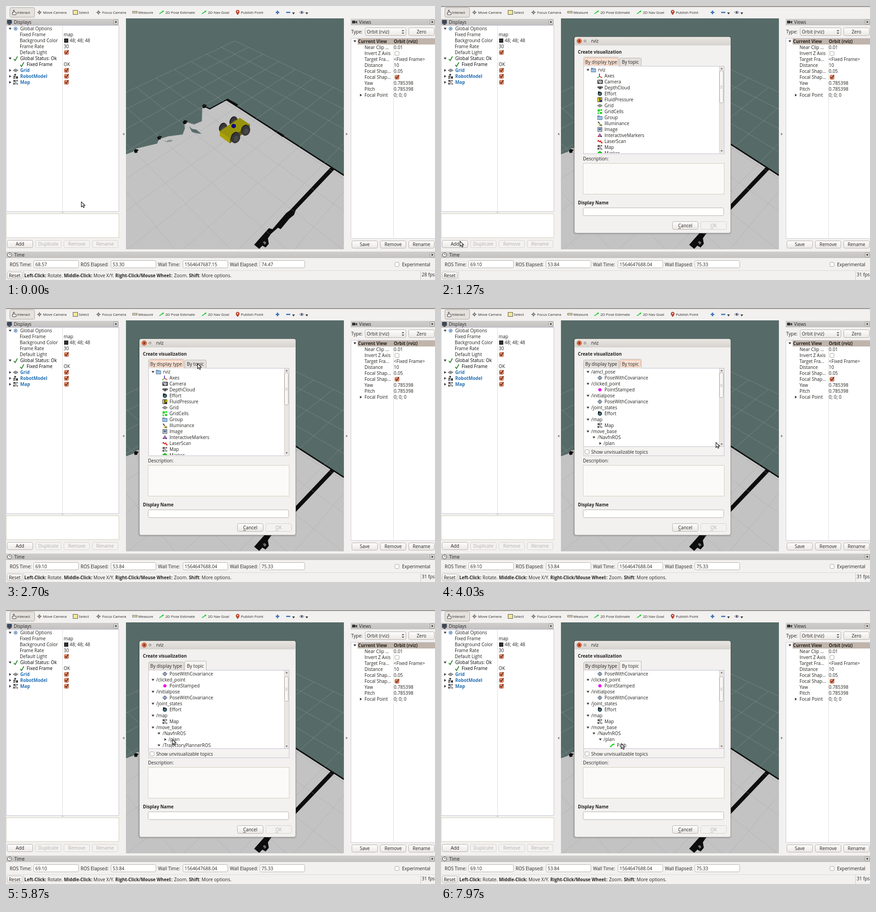
Animation, 937 px wide and 598 px high, one loop 8000 ms. Source, as an HTML page:

```html
<!DOCTYPE html>
<html lang="en">
<head>
<meta charset="utf-8">
<title>Adding a display</title>
<style>
  html, body { margin: 0; width: 100%; height: 100%; overflow: hidden; background: #f2f1f0; }
  svg { display: block; width: 100vw; height: 100vh; }
  text { font: 10px 'Open Sans', 'Noto Sans', sans-serif; fill: #242320; white-space: pre; }
  .bold { font-weight: 700; font-size: 9.7px; }
  .tool { font-size: 8px; }
  .link { font-weight: 700; font-size: 9.8px; fill: #2470b5; }
  .dark { fill: #000; }
  .off { fill: #b5afa9; }
  .mid { text-anchor: middle; }
</style>
</head>
<body>
<svg id="stage" viewBox="0 0 937 598" xmlns="http://www.w3.org/2000/svg"></svg>
<script>
const LOOP = 8000;
const TEAL = '#566b68', FLOOR = '#c3c3c3', INK = '#0d0d0d';

const rect = (x, y, w, h, fill, stroke = 'none', r = 0) =>
  `<rect x="${x}" y="${y}" width="${w}" height="${h}" rx="${r}" fill="${fill}" stroke="${stroke}"/>`;
const box = (x, y, w, h, fill, stroke, r = 0) => rect(x + .5, y + .5, w - 1, h - 1, fill, stroke, r);
const text = (x, y, s, cls = '', id = '') =>
  `<text x="${x}" y="${y}" class="${cls}"${id && ` id="${id}"`}>${s.replace(/</g, '&lt;')}</text>`;
const poly = (pts, fill, more = '') => `<polygon points="${pts}" fill="${fill}" ${more}/>`;
const path = (d, stroke, w = 1, fill = 'none') =>
  `<path d="${d}" stroke="${stroke}" stroke-width="${w}" fill="${fill}"/>`;
const dot = (x, y, r, fill, stroke = 'none') =>
  `<circle cx="${x}" cy="${y}" r="${r}" fill="${fill}" stroke="${stroke}"/>`;
const group = (id, body, more = '') => `<g id="${id}" ${more}>${body}</g>`;

const button = (x, y, w, h, label, off) => box(x, y, w, h, off ? '#f3f2f0' : 'url(#btn)', off ? '#d6d2cd' : '#b4aea8', 3) +
  text(x + w / 2, y + h / 2 + 3.5, label, 'mid' + (off ? ' off' : ''));
const input = (x, y, w, h) => box(x, y, w, h, '#fff', '#b5afa9', 3);
const check = (x, y, on) => box(x, y, 10, 10, on ? '#ea8a68' : '#fdfdfd', on ? '#b9603f' : '#aaa49e', 2) +
  (on ? path(`M${x + 2} ${y + 4.5}l2.5 3l5 -7.5`, '#4a2a1c', 1.6) : '');
const arrowDown = (x, y) => poly(`${x - 3},${y - 2} ${x + 3},${y - 2} ${x},${y + 2.5}`, '#3c3b37');
const arrowRight = (x, y) => poly(`${x - 2},${y - 3} ${x + 2.5},${y} ${x - 2},${y + 3}`, '#3c3b37');
const tick = (x, y) => path(`M${x - 4} ${y + 1}l3 3.5l5 -9`, '#1d7f1d', 1.7);
const closer = (x, y) => box(x - 5, y - 5, 10, 10, '#f4f3f1', '#8d8984', 1) +
  path(`M${x - 2} ${y - 2}l4 4m0 -4l-4 4`, '#33322f', 1.5);
const header = (x, y, w, label, tx) => rect(x, y, w, 14, 'url(#head)') + text(tx, y + 11, label);

const icons = {
  axes: (x, y) => path(`M${x - 1} ${y - 5}v6`, '#2222dd', 1.6) + path(`M${x - 1} ${y + 1}l-5 4`, '#2faa2f', 1.6) +
    path(`M${x - 1} ${y + 1}l6 3`, '#d22', 1.6),
  camera: (x, y) => rect(x - 5, y - 4, 11, 8, '#555', '#333', 1) + dot(x + 1, y, 2.8, '#9ab', '#ddd') + rect(x - 4, y - 3, 2, 2, '#eee'),
  cloud: (x, y) => rect(x - 5, y - 3, 11, 4, '#333', 'none', 1) + rect(x - 2, y + 1, 5, 2, '#444') +
    dot(x - 2, y - 1, 1, '#ccc') + dot(x + 3, y - 1, 1, '#ccc'),
  effort: (x, y) => dot(x, y, 4.6, '#26343c') + dot(x, y + .5, 2.4, '#4b8394') + rect(x - 4, y - 5, 3, 3, '#111'),
  fluid: (x, y) => rect(x - 5, y - 5, 10, 10, '#222') + rect(x - 4, y - 4, 3, 8, '#f0e000') +
    rect(x + 1, y - 4, 3, 5, '#e8d800') + dot(x + 2, y + 2, 1.5, '#3355cc'),
  grid: (x, y) => path(`M${x - 5} ${y}l5 -3l5 3l-5 3zM${x - 2.5} ${y - 1.5}l5 3m0 -3l-5 3`, '#555', 1.1),
  cells: (x, y) => rect(x - 5, y - 5, 5, 5, '#19d319') + rect(x + 1, y - 5, 4, 3, '#19d319') +
    rect(x - 5, y + 2, 3, 3, '#19d319') + rect(x, y + 1, 5, 4, '#19d319'),
  folder: (x, y) => path(`M${x - 5} ${y - 4}h4l1 1.5h5v7h-10z`, '#4b6f96', 1, '#7fa6cf') + rect(x - 4.5, y - 1, 9, 4.5, '#a5c4e3'),
  light: (x, y) => path(`M${x - 4} ${y - 4}l4 5`, '#333', 2) + poly(`${x - 2},${y} ${x + 5},${y + 1} ${x + 3},${y + 5} ${x - 3},${y + 5}`, '#d4cf6a') +
    rect(x, y + 3, 5, 2, '#555'),
  image: (x, y) => rect(x - 4.5, y - 4.5, 9, 9, '#dfe6ee', '#444') + rect(x - 3, y - 3, 6, 5, '#5a7ca5'),
  marks: (x, y) => poly(`${x},${y - 5} ${x + 5},${y + 3} ${x - 5},${y + 3}`, '#555') + dot(x, y, 2, '#d6d') +
    dot(x - 3, y + 2, 1.5, '#c33') + dot(x + 3, y + 2, 1.5, '#33c'),
  scan: (x, y) => path(`M${x - 5} ${y}l2 -2l2 3l3 -2l1 4h3`, '#dc1414', 1.8),
  map: (x, y) => rect(x - 5, y - 5, 5, 4, '#555') + rect(x + 1, y - 5, 4, 3, '#777') + rect(x - 5, y + 1, 3, 4, '#444') +
    rect(x - 1, y - 1, 3, 6, '#999') + rect(x + 3, y + 2, 2, 3, '#555'),
  marker: (x, y) => poly(`${x - 5},${y - 2} ${x},${y - 5} ${x + 5},${y - 2} ${x + 5},${y + 3} ${x},${y + 5} ${x - 5},${y + 3}`, '#18c018'),
  pose: (x, y) => poly(`${x - 5},${y} ${x},${y - 4.5} ${x + 5},${y} ${x},${y + 4.5}`, '#8791ad', 'stroke="#50566b"') +
    path(`M${x - 4} ${y}h8`, '#b9bfd2'),
  point: (x, y) => dot(x, y, 3.5, '#f014e4'),
  path: (x, y) => path(`M${x - 5} ${y + 3}q3 -1 4 -3t6 -3`, '#14d314', 2.4),
  robot: (x, y) => rect(x - 3, y - 5, 4, 3, '#333') + rect(x - 5, y - 1, 5, 3, '#555') + rect(x + 1, y, 4, 5, '#333') +
    rect(x - 5, y + 3, 3, 2, '#222') + rect(x - 1, y + 3, 1, 2, '#222'),
};

// Orbit camera: distance 10, yaw and pitch 45 degrees, 45 degree field of view
function project(x, y, z = 0) {
  const near = (x + y) / 2, depth = 10 - near - z * Math.SQRT1_2, focal = 608.4;
  return `${(500 + focal * (y - x) * Math.SQRT1_2 / depth).toFixed(1)} ${(279 + focal * (near - z * Math.SQRT1_2) / depth).toFixed(1)}`;
}

function ragged(points, step = 4) {
  const out = [];
  points.forEach(([x, y], i) => {
    const [nx, ny] = points[i + 1] || [x, y];
    const n = Math.max(1, Math.round(Math.hypot(nx - x, ny - y) / step));
    for (let k = 0; k < n; k++) {
      const px = x + (nx - x) * k / n, py = y + (ny - y) * k / n;
      out.push([px, py], [px + 1.5, py - 1.2]);
    }
  });
  return out.map(p => p.map(v => v.toFixed(1)).join()).join(' ');
}

function wheel(x, y, rx, ry) {
  const turn = `transform="rotate(24 ${x} ${y})"`;
  return `<ellipse cx="${x - 2}" cy="${y - 1}" rx="${rx}" ry="${ry}" fill="#222" ${turn}/>` +
    `<ellipse cx="${x}" cy="${y}" rx="${rx}" ry="${ry}" fill="#373737" ${turn}/>` +
    `<ellipse cx="${x + 1}" cy="${y + 1}" rx="${rx * .55}" ry="${ry * .55}" fill="#484848" ${turn}/>`;
}

function robot() {
  const top = .3, base = .07;
  const corner = (a, b, z) => project(a * .5, b * .25, z);
  const face = (...pts) => pts.join(' ');
  return wheel(498, 253, 8, 11) + wheel(475, 267, 8, 11) +
    poly(face(corner(1, -1, top), corner(-1, -1, top), corner(-1, 1, top), corner(1, 1, top)), '#98930c') +
    poly(face(corner(1, -1, top), corner(1, 1, top), corner(1, 1, base), corner(1, -1, base)), '#aaa106') +
    poly(face(corner(1, 1, top), corner(-1, 1, top), corner(-1, 1, base), corner(1, 1, base)), '#5f5b08') +
    wheel(502, 288, 9, 12) + wheel(524, 272, 9, 11.5) +
    poly('492,260 496,257 502,259 502,264 498,267 493,265', '#08087c');
}

function scene() {
  const edge = [[262, 324], [276, 319], [283, 312], [308, 306], [329, 301], [334, 291], [354, 285], [385, 281],
    [390, 268], [389, 257], [397, 255], [410, 259], [427, 252], [428, 222]];
  let grid = '';
  for (let i = -5; i <= 5; i++) {
    grid += `M${project(i, -5)}L${project(i, 5)}M${project(-5, i)}L${project(5, i)}`;
  }
  const specks = [[391, 253], [335, 287], [284, 316], [433, 218]].map(([x, y]) =>
    poly(`${x - 5},${y} ${x - 1},${y - 4} ${x + 6},${y - 2} ${x + 3},${y + 1} ${x + 3},${y + 4} ${x - 3},${y + 5}`, INK)).join('');
  return rect(262, 27, 476, 504, TEAL) +
    poly(ragged(edge) + ' 432,218 445,225 482,205 738,370 738,531 262,531', FLOOR) +
    poly('400,262 406,268 416,270 427,279 417,278 406,275', TEAL) +
    poly('342,293 350,295 357,292 365,293 360,296 352,297', '#84908e') +
    path('M432 218L445 224.5L482 204.5', INK, 2.5) + path('M482 204.5L738 369.5', INK, 3) +
    poly('479,205 484,202 507,215 503,219', INK) + poly('584,272 589,271 608,282 604,286', INK) + specks +
    poly('709,352 717,357 633,445 629,456 619,464 600,487 594,484 579,497 572,507 574,519 567,527 560,523 553,530 542,521 574,485 582,487 612,452 620,446', INK) +
    poly('561,515 565,513 569,517 565,521', '#66716f') +
    path(grid, 'rgba(160,160,164,.45)') + robot();
}

function toolbar() {
  const arrow = (x) => path(`M${x} 17l9 -6`, '#22cc33', 1.8) + poly(`${x + 10},10 ${x + 5},11 ${x + 8},14`, '#22cc33');
  const move = (x) => path(`M${x - 5} 14h10M${x} 9v10`, '#555') + dot(x, 14, 2.5, '#aaa', '#555');
  const plus = 'M589 14h8M593 10v8';
  const labels = [[24, 'Interact'], [81, 'Move Camera'], [159, 'Select'], [210, 'Focus Camera'], [289, 'Measure'],
    [348, '2D Pose Estimate'], [441, '2D Nav Goal'], [513, 'Publish Point']];
  return rect(0, 0, 937, 27, '#f2f1f0') +
    group('topShade', rect(0, 0, 937, 1.5, '#77716d') + rect(0, 1.5, 937, 1.5, '#d2cecb')) +
    box(8, 3, 55, 22, '#e5e1dd', '#aaa39c', 3) +
    path('M14 19v-5l2 1v-6h2v4l4 1v5z', '#333', 1, '#fff') + move(73) + box(146, 9, 11, 10, '#f4e895', '#555') +
    move(202) + box(276, 11, 11, 5, '#d7cf9b', '#777') + arrow(335) + arrow(428) +
    path('M506 19c-6 -7 -3 -10 0 -10s6 3 0 10z', '#a3301d', 1, '#c94630') + dot(506, 12, 1.3, '#fff') +
    path(plus, '#386fb5', 2.6) + path('M612 14h9', '#386fb5', 2.6) +
    path('M641 14q5 -5 10 0q-5 5 -10 0', '#666', 1, '#fff') + dot(646, 14, 2, '#3d4a7a') +
    arrowDown(628, 16) + arrowDown(657, 16) + labels.map(([x, s]) => text(x, 17, s, 'tool')).join('');
}

function displays() {
  const y = (i) => 49.5 + 13 * i;
  const rows = [['Global Options', 31], ['Fixed Frame', 30, 'map'], ['Background Color', 30, '48; 48; 48', 139],
    ['Frame Rate', 30, '30'], ['Default Light', 30, true], ['Global Status: Ok', 31], ['Fixed Frame', 45, 'OK'],
    ['Grid', 31, true], ['RobotModel', 31, true], ['Map', 31, true]];
  const style = (i) => i > 6 ? 'link' : i > 4 ? 'dark' : '';
  return header(0, 28, 246, 'Displays', 17) + rect(3, 31, 9, 7, '#3a4a66', '#222') + rect(5, 39, 5, 2, '#444') + closer(240, 35) +
    box(0, 42, 247, 407, '#fff', '#c9c4d8') + rect(123, 43, 1, 405, '#dedbd8') + rect(122, 450, 3, 1, '#999') +
    rows.map(([s, x, v, vx = 126], i) => text(x, y(i) + 3.5, s, style(i)) +
      (v === true ? check(127, y(i) - 5, true) : v ? text(vx, y(i) + 3.5, v) : '')).join('') +
    rect(127.5, 71.5, 8, 8, '#303030', '#111') + arrowDown(9, y(0)) + arrowDown(9, y(5)) +
    [7, 8, 9].map(i => arrowRight(9, y(i))).join('') + dot(21, y(0), 3.6, '#cfe0f1', '#3f72ad') + dot(21, y(0), 1.5, '#3f72ad') +
    tick(21, y(5)) + tick(35, y(6)) + icons.grid(21, y(7)) + icons.robot(21, y(8)) + icons.map(21, y(9)) +
    box(0, 453, 247, 53, '#fff', '#d3cdb5') + button(2, 511, 57, 17, 'Add') +
    button(64, 511, 57, 17, 'Duplicate', 1) + button(126, 511, 57, 17, 'Remove', 1) + button(188, 511, 57, 17, 'Rename', 1);
}

function views() {
  const rows = [['Near Clip ...', '0.01'], ['Invert Z Axis', false], ['Target Fra...', '<Fixed Frame>'], ['Distance', '10'],
    ['Focal Shap...', '0.05'], ['Focal Shap...', true], ['Yaw', '0.785398'], ['Pitch', '0.785398'], ['Focal Point', '0; 0; 0']];
  return header(753, 28, 184, 'Views', 771) + rect(756, 32, 7, 6, '#333') + poly('763,35 767,32 767,39', '#333') + closer(931, 35) +
    text(754, 59.5, 'Type:') + box(784, 47, 90, 18, 'url(#btn)', '#b4aea8', 3) + text(788, 59.5, 'Orbit (rviz)') +
    poly('864,55 870,55 867,52', '#555') + poly('864,58 870,58 867,61', '#555') + button(879, 47, 57, 18, 'Zero') +
    box(753, 70, 185, 438, '#fff', '#cfcad6') + rect(846, 84, 1, 422, '#dedbd8') + rect(768, 71, 169, 13, '#c0b4aa') +
    arrowDown(762, 77) + text(769, 81, 'Current View', 'bold') + text(847, 81, 'Orbit (rviz)', 'bold') +
    rows.map(([s, v], i) => text(783, 94 + 13 * i, s) +
      (typeof v === 'string' ? text(847, 94 + 13 * i, v) : check(849, 85.5 + 13 * i, v))).join('') + arrowRight(775, 194.5) +
    button(755, 512, 57, 17, 'Save') + button(817, 512, 57, 17, 'Remove') + button(879, 512, 57, 17, 'Rename');
}

const clocks = [
  { id: 'ros', label: 'ROS Time:', x: 8, field: 60, from: 68.57, to: 69.10 },
  { id: 'rosRun', label: 'ROS Elapsed:', x: 163, field: 229, from: 53.30, to: 53.84 },
  { id: 'wall', label: 'Wall Time:', x: 332, field: 386, from: 1564647687.15, to: 1564647688.04 },
  { id: 'wallRun', label: 'Wall Elapsed:', x: 489, field: 554, from: 74.47, to: 75.33 },
];

function footer() {
  const help = '<tspan class="bold">Left-Click:</tspan> Rotate. <tspan class="bold">Middle-Click:</tspan> Move X/Y. ' +
    '<tspan class="bold">Right-Click/Mouse Wheel:</tspan>: Zoom. <tspan class="bold">Shift</tspan>: More options.';
  return header(0, 536, 937, 'Time', 18) + dot(8, 543, 4.5, '#fff', '#333') + path('M8 540v3h2.5', '#333') + closer(931, 543) +
    clocks.map(c => text(c.x, 568, c.label) + input(c.field, 555, 99, 17) + text(c.field + 4, 567.5, '', '', c.id)).join('') +
    check(849, 559, false) + text(865, 568, 'Experimental') + rect(0, 577, 937, 1, '#dcd9d6') + button(2, 580, 34, 16, 'Reset') +
    rect(38, 579, 1, 18, '#cbc7c3') + rect(905, 579, 1, 18, '#cbc7c3') +
    `<text id="help" x="40" y="592">${help}</text>` + text(908, 590, '', '', 'fps');
}

const rowY = (i) => 139.5 + 13 * i;
function typeRows() {
  const rows = [['Axes', 'axes'], ['Camera', 'camera'], ['DepthCloud', 'cloud'], ['Effort', 'effort'], ['FluidPressure', 'fluid'],
    ['Grid', 'grid'], ['GridCells', 'cells'], ['Group', 'folder'], ['Illuminance', 'light'], ['Image', 'image'],
    ['InteractiveMarkers', 'marks'], ['LaserScan', 'scan'], ['Map', 'map'], ['Marker', 'marker']];
  return arrowDown(321, rowY(0)) + icons.folder(333, rowY(0)) + text(343, rowY(0) + 3.5, 'rviz') +
    rows.map(([s, icon], i) => icons[icon](347, rowY(i + 1)) + text(357, rowY(i + 1) + 3.5, s)).join('');
}

function topicRows() {
  const rows = [['/amcl_pose'], ['PoseWithCovariance', 'pose'], ['/clicked_point'], ['PointStamped', 'point'], ['/initialpose'],
    ['PoseWithCovariance', 'pose'], ['/joint_states'], ['Effort', 'effort'], ['/map'], ['Map', 'map'], ['/move_base']];
  return rows.map(([s, icon], i) => (icon ? icons[icon](347, rowY(i)) : arrowDown(321, rowY(i))) +
      text(icon ? 357 : 328, rowY(i) + 3.5, s)).join('') +
    arrowDown(334, rowY(11)) + text(342, rowY(11) + 3.5, '/NavfnROS') + text(355, rowY(12) + 3.5, '/plan') +
    group('closed', arrowRight(348, rowY(12)) + arrowDown(334, rowY(13)) + text(342, rowY(13) + 3.5, '/TrajectoryPlannerROS')) +
    group('opened', arrowDown(348, rowY(12)) + icons.path(374, rowY(13)) + text(384, rowY(13) + 3.5, 'Path'));
}

function list(bottom, thumb, id, rows) {
  const h = bottom - 132, mid = 141 + thumb / 2;
  return `<g clip-path="url(#${id}Clip)">${group(id + 'Rows', rows)}</g>` + rect(608, 132, 10, h, '#e9e6e2') +
    rect(607.5, 132, .8, h, '#cbc6c0') + arrowScroll(137, -1) + arrowScroll(bottom - 5, 1) +
    group(id + 'Thumb', box(608, 141, 9, thumb, '#f8f7f5', '#aca69f', 3) +
      path(`M610.5 ${mid - 2}h4m-4 2.5h4m-4 2.5h4`, '#aaa49d', .8));
}
const arrowScroll = (y, dir) => poly(`610.5,${y - dir} 615.5,${y - dir} 613,${y + 2 * dir}`, '#666');
const tab = (x, w, top, front) => path(`M${x + .5} 131.5V${top + 3}q0 -2.5 2.5 -2.5h${w - 6}q2.5 0 2.5 2.5V131.5`,
  '#bbb5ae', 1, front ? '#f6f5f3' : '#e4e1dd');
const focus = (x, w) => box(x, 113, w, 16, '#f9e2d5', '#e0a285', 2);

function dialog() {
  return rect(288, 66, 347, 433, 'rgba(0,0,0,.08)', 'none', 6) + rect(290, 66, 343, 431, 'rgba(0,0,0,.14)', 'none', 5) +
    box(291, 67, 342, 429, '#f2f1f0', '#b5b1ac', 4) + rect(292, 68, 340, 18, 'url(#title)', 'none', 3) +
    dot(302, 76.5, 5, '#ea6f46', '#a9502f') + path('M300 74.5l4 4m0 -4l-4 4', '#5c2411', 1.2) +
    dot(314.5, 76.5, 4.5, '#e7e3df') + box(312, 74, 5, 5, 'none', '#77736f') + text(328, 80, 'rviz') +
    text(299, 104, 'Create visualization', 'bold') + box(311, 131, 308, 192, '#f4f3f1', '#c5bfd0') +
    group('byType', tab(390, 48, 113) + tab(311, 78, 111, 1) + focus(313, 74) + rect(312, 132, 296, 190, '#fff') +
      list(321, 71, 'type', typeRows())) +
    group('byTopic', tab(311, 78, 113) + tab(390, 48, 111, 1) + group('topicFocus', focus(392, 44)) + rect(312, 132, 296, 170, '#fff') +
      list(302, 55, 'topic', topicRows()) + rect(312, 302, 306, 1, '#c5bfd0') + check(314, 309, false) +
      text(328, 318, 'Show unvisualizable topics')) +
    text(315, 125.5, 'By display type') + text(395, 125.5, 'By topic') +
    text(310, 337, 'Description:') + box(310, 343, 309, 68, '#fbfaf9', '#d3cdb5') + text(299, 433, 'Display Name', 'bold') +
    input(310, 440, 308, 18) + button(505, 470, 57, 18, 'Cancel') + button(567, 470, 57, 18, 'OK', 1) +
    rect(518, 485, 6, .8, '#33322f') + rect(588, 485, 7, .8, '#b5afa9');
}

const gradient = (id, a, b) => `<linearGradient id="${id}" x2="0" y2="1"><stop stop-color="${a}"/><stop offset="1" stop-color="${b}"/></linearGradient>`;
const clip = (id, x, y, w, h) => `<clipPath id="${id}">${rect(x, y, w, h, '#000')}</clipPath>`;

document.getElementById('stage').innerHTML =
  `<defs>${gradient('btn', '#fdfdfc', '#ebe8e5')}${gradient('head', '#cfcecd', '#c3c2c1')}${gradient('title', '#e9e6e3', '#d6d2cd')}` +
  clip('view', 262, 27, 476, 504) + clip('typeClip', 312, 132, 296, 189) + clip('topicClip', 312, 133, 296, 168) + '</defs>' +
  rect(0, 0, 937, 598, '#f2f1f0') + `<g clip-path="url(#view)">${scene()}</g>` + toolbar() + displays() + views() + footer() +
  poly('254.5,279.5 258.5,276.5 258.5,282.5', '#8b8781') + poly('746.5,279.5 742.5,276.5 742.5,282.5', '#8b8781') +
  group('dialog', dialog()) +
  group('cursor', path('M.5 .5v11l2.6 -2.4l2 4l2 -1l-1.9 -3.8h3.4z', '#111', 1.1, '#fff'));

const cursorKeys = [[0, 164, 427], [720, 41, 513], [1450, 41, 513], [2450, 418, 121], [2850, 418, 121], [3900, 600, 293],
  [4040, 600, 293], [4230, 609, 295], [4450, 609, 295], [5130, 505, 299], [6050, 347, 280], [6900, 347, 280], [7600, 393, 291], [LOOP, 393, 291]];
const OPEN = 880, TOPIC = 2800, SCROLL = 4300, EXPAND = 6400;
const el = (id) => document.getElementById(id);
const show = (id, on) => el(id).setAttribute('display', on ? 'inline' : 'none');
const move = (id, x, y) => el(id).setAttribute('transform', `translate(${x} ${y})`);

function cursorAt(t) {
  const i = cursorKeys.findIndex(k => k[0] > t);
  const [t0, x0, y0] = cursorKeys[i - 1], [t1, x1, y1] = cursorKeys[i];
  const p = (t - t0) / (t1 - t0), e = p * p * (3 - 2 * p);
  return [x0 + (x1 - x0) * e, y0 + (y1 - y0) * e].map(Math.round);
}

function draw(t) {
  const run = Math.min(1, Math.floor(t / 33.4) * 33.4 / 860);
  for (const c of clocks) el(c.id).textContent = (c.from + (c.to - c.from) * run).toFixed(2);
  el('fps').textContent = t < 600 ? '28 fps' : '31 fps';
  show('help', t < 700 || t >= 1950);
  show('dialog', t >= OPEN);
  show('topShade', t >= OPEN);
  show('byType', t < TOPIC);
  show('byTopic', t >= TOPIC);
  show('topicFocus', t < SCROLL);
  show('closed', t < EXPAND);
  show('opened', t >= EXPAND);
  move('topicRows', 0, t < SCROLL ? 0 : -13);
  move('topicThumb', 0, t < SCROLL ? 0 : 4);
  move('cursor', ...cursorAt(t));
}

const start = performance.now();
function tickFrame() {
  draw((performance.now() - start) % LOOP);
  requestAnimationFrame(tickFrame);
}
tickFrame();
</script>
</body>
</html>
```
